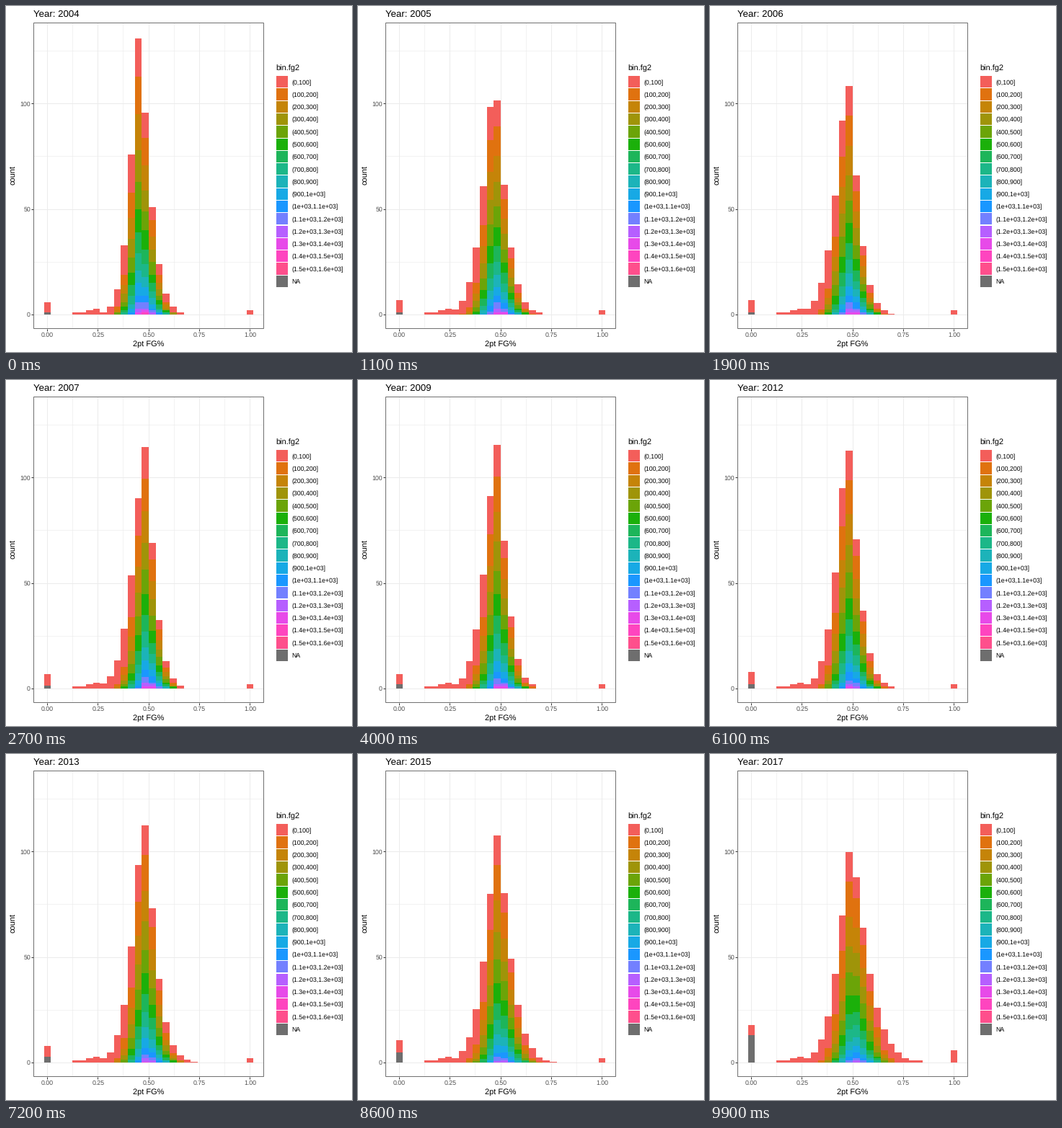
A matplotlib script that plays this animation: 480x480 px, repeating every 10000 ms.

```python
import numpy as np
import matplotlib.pyplot as plt
from matplotlib.animation import FuncAnimation
from matplotlib.patches import Rectangle

plt.rcParams["font.family"] = "Liberation Sans"
plt.rcParams["text.hinting"] = "no_hinting"

FRAMES, INTERVAL = 100, 100
SIZE, DPI = 480, 100
PX = 72 / DPI  # points per pixel
LEFT, RIGHT, TOP, BOTTOM = 38.5, 357.5, 23.5, 447.5
FIRST, LAST = 2004, 2017
BINS = 30
COLORS = ["#F35E5A", "#E0720F", "#C58408", "#9F9409", "#6BA408", "#1BB00A",
          "#1DB55A", "#1CB788", "#1CB3B9", "#17A9E5", "#1A97FF", "#7380FF",
          "#B65FFF", "#E74AE9", "#FE45BF", "#FE4F8C", "#6E6E6E"]
LEVELS = len(COLORS)

# year, peak count, centre bin, fall-off to the left and to the right
SHAPES = np.array([
    (2004.0, 134, 13.1, 0.50, 0.39),
    (2005.4, 110, 13.6, 0.31, 0.35),
    (2007.5, 119, 13.9, 0.33, 0.46),
    (2013.5, 120, 13.7, 0.36, 0.35),
    (2015.3, 108, 14.0, 0.31, 0.30),
    (2017.0, 103, 14.2, 0.30, 0.21),
])


def px(value):
    return 57.6 + 281 * value


def py(count):
    return 428.3 - 2.925 * count


def year_counts(year):
    """Whole-number upper edge of every level, indexed by bin and level."""
    peak, centre, fall_l, fall_r = (
        np.interp(year, SHAPES[:, 0], col) for col in SHAPES.T[1:])
    t = (year - FIRST) / (LAST - FIRST)
    k = np.arange(BINS)
    d = k - centre

    # skewed bell with a thin tail on the left
    total = peak * np.exp(-np.where(d < 0, fall_l, fall_r) * abs(d) ** 1.4)
    tail = 2.7 * 0.65 ** (7.0 - k)
    total = np.where(k < 8, np.maximum(total, tail), total)
    total[k < 4] = 0

    # players above 100 attempts, thinning out towards the highest level
    upper = total * 0.88 * np.exp(-(abs(d - 1) / 4.1) ** 3)
    drop = 2.8 * np.maximum(0.2 - d, 0) + 2 * np.maximum(d - 1.3, 0)
    reach = np.maximum(14.8 - 1.8 * t - drop, 3)
    tops = np.zeros((BINS, LEVELS))
    tops[:, 0] = total
    for j in range(LEVELS - 2):
        tops[:, j + 1] = upper * np.clip(1 - j / reach, 0, 1) ** 2.4

    # outliers at 0 and 1, which surge near the end
    missing = 1 + 2 * t + 10 * t ** 12
    tops[0] = missing
    tops[0, 0] += 5.5
    tops[-1, 0] = 1.5 + 4.5 * t ** 12
    return np.round(tops)


YEARS = np.arange(FIRST, LAST + 1)
STOPS = np.round(np.linspace(0, FRAMES - 1, len(YEARS)))
COUNTS = np.array([year_counts(y) for y in YEARS])


def counts_at(frame):
    i = min(np.searchsorted(STOPS, frame, side="right"), len(STOPS) - 1)
    u = (frame - STOPS[i - 1]) / (STOPS[i] - STOPS[i - 1])
    return COUNTS[i - 1] * (1 - u) + COUNTS[i] * u


fig = plt.figure(figsize=(SIZE / DPI, SIZE / DPI), dpi=DPI, facecolor="white")
ax = fig.add_axes([0, 0, 1, 1])
ax.set_xlim(0, SIZE)
ax.set_ylim(SIZE, 0)
ax.axis("off")


def line(xs, ys, color, width=1.0, z=1):
    # strokes snap to pixel centres, half a pixel further on
    ax.plot(np.array(xs) - 0.5, np.array(ys) - 0.5, color=color,
            lw=width * PX, zorder=z, solid_capstyle="butt")


def text(x, y, label, size, color="black", **kw):
    kw.setdefault("va", "baseline")
    return ax.text(x, y, label, fontsize=size * PX, color=color, **kw)


def draw_panel():
    for v in np.arange(0.125, 1, 0.25):
        line([px(v)] * 2, [TOP, BOTTOM], "#EBEBEB", 0.6)
    for c in (25, 75, 125):
        line([LEFT, RIGHT], [py(c)] * 2, "#EBEBEB", 0.6)
    for v in np.linspace(0, 1, 5):
        line([px(v)] * 2, [TOP, BOTTOM], "#EBEBEB")
        line([px(v)] * 2, [BOTTOM + 1, BOTTOM + 4], "#333333", z=4)
        text(px(v), 459, f"{v:.2f}", 8.8, "#4D4D4D", ha="center")
    for c in (0, 50, 100):
        line([LEFT, RIGHT], [py(c)] * 2, "#EBEBEB")
        line([LEFT - 3, LEFT], [py(c)] * 2, "#333333", z=4)
        text(34, py(c) + 2.8, str(c), 8.8, "#4D4D4D", ha="right")
    ax.add_patch(Rectangle((LEFT - 0.5, TOP - 0.5), RIGHT - LEFT, BOTTOM - TOP,
                           fill=False, ec="#707070", lw=PX, zorder=5))
    text(197.5, 472, "2pt FG%", 11, ha="center")
    text(10, 234.5, "count", 11, ha="center", va="center", rotation=90)


def level_label(i):
    if i == LEVELS - 1:
        return "NA"
    low, high = (str(n) if n < 1000 else f"{n / 1000:g}e+03"
                 for n in (i * 100, i * 100 + 100))
    return f"({low},{high}]"


def draw_legend():
    text(374.5, 90, "bin.fg2", 11)
    for i, color in enumerate(COLORS):
        y = 105.3 + 17.28 * i
        ax.add_patch(Rectangle((375, y - 8.1), 16, 16.2, fc=color, lw=0))
        text(396.7, y + 3.4, level_label(i), 8.8)


draw_panel()
draw_legend()
title = text(38, 15, "", 13.2)

bars = {}
width = 281 / (BINS - 1)
for k, j in np.argwhere(COUNTS.any(axis=0)):
    left = px(k / (BINS - 1)) - width / 2
    bars[k, j] = ax.add_patch(
        Rectangle((left, py(0)), width, 0, fc=COLORS[j], lw=0,
                  zorder=2 + j / LEVELS))


def update(frame):
    counts = counts_at(frame)
    for (k, j), bar in bars.items():
        h = counts[k, j]
        # a level fully covered by the next one has no visible part
        covered = j + 1 < LEVELS and counts[k, j + 1] >= h
        bar.set_visible(h > 0 and not covered)
        bar.set_y(py(h))
        bar.set_height(py(0) - py(h))
    year = FIRST + (LAST - FIRST) * frame // (FRAMES - 1)
    title.set_text(f"Year: {year}")
    return [title, *bars.values()]


anim = FuncAnimation(fig, update, frames=FRAMES, interval=INTERVAL,
                     repeat=True, repeat_delay=0, blit=False)
plt.show()
```
